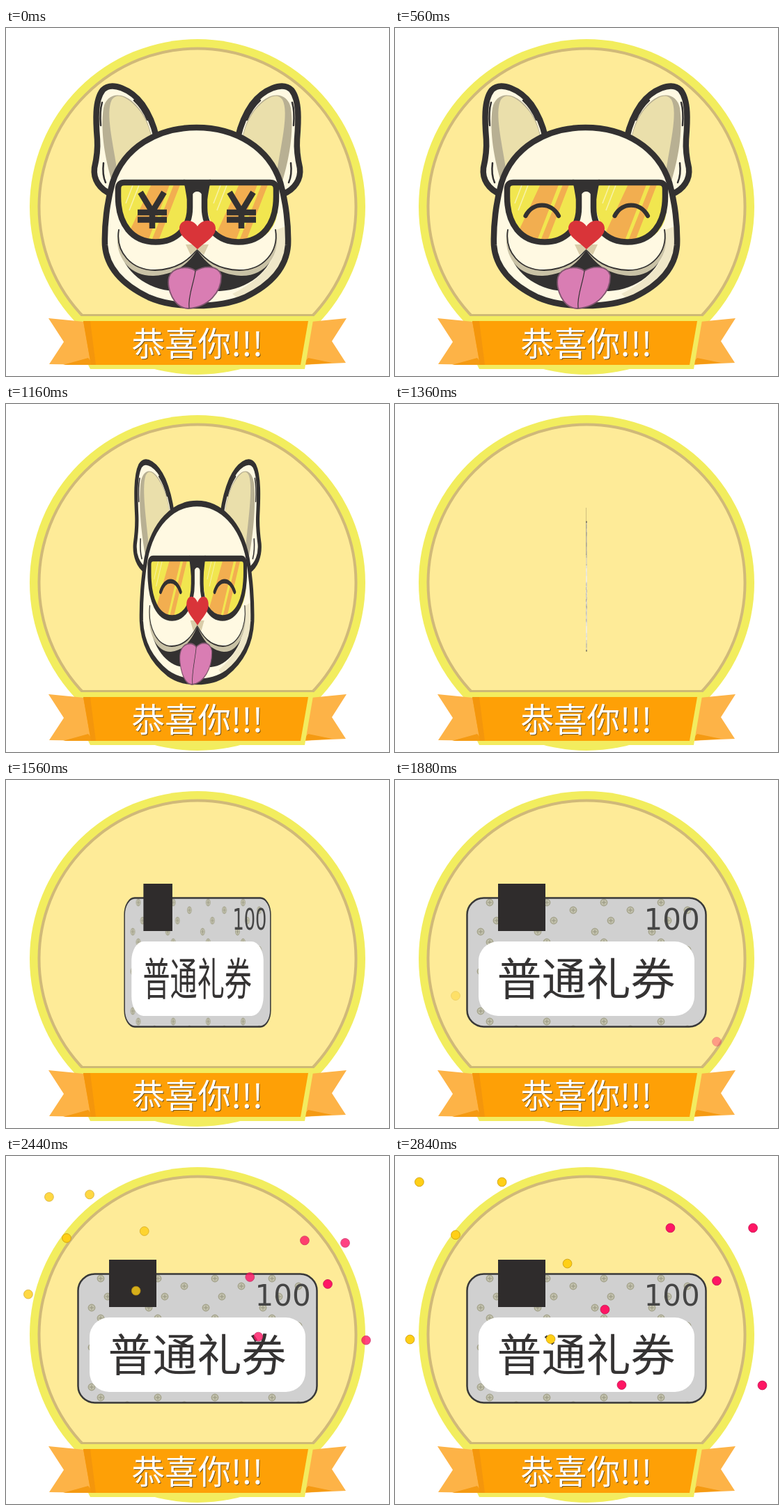
Recreate the animation shown at these times as an HTML page. Size 550 by 500 pixels, loop 2880 ms.

```html
<!DOCTYPE html>
<html lang="zh">
<head>
<meta charset="utf-8">
<style>
  html, body { margin: 0; width: 100%; height: 100%; overflow: hidden; background: #fff; }
  svg { display: block; width: 100vw; height: 100vh; }
  .cjk { font-family: "Noto Sans CJK SC", "Noto Sans CJK", sans-serif; text-anchor: middle; }
  .ink { fill: none; stroke: #333131; stroke-linecap: round; stroke-linejoin: round; }
</style>
</head>
<body>
<svg viewBox="0 0 550 500">
  <defs>
    <path id="lens" d="M170 222H255Q264 222 264 232V258C264 288 244 307.500 215 307.500C181 307.500 161 282 161 242V231Q161 222 170 222Z"/>
    <clipPath id="lensClip"><use href="#lens"/></clipPath>
    <path id="skull" d="M273.500 143C217 143 169 172 153 222C145 250 141 285 142 312C145 352 178 374 205 387C228 397 250 399 273.500 399C297 399 320 397 343 387C370 374 402 352 405 312C406 285 402 250 394 222C378 172 330 143 273.500 143Z"/>
    <clipPath id="skullClip"><use href="#skull"/></clipPath>
    <path id="earShape" d="M152 239C134 232 125 217 127 201C130 188 132 175 131 160C129 135 127 104 139 89C152 76 180 88 196 110Q210 130 216 157"/>

    <g id="ear">
      <use href="#earShape" fill="#fff9e2"/>
      <path d="M152 220C143 190 135 150 140 115C144 95 164 90 182 106C196 118 206 136 210 160L164 212Z" fill="#b8b093"/>
      <path d="M160 208C155 170 142 122 152 103C162 88 184 108 193 120C202 133 207 146 209 160C186 172 170 188 160 208Z" fill="#eadfab"/>
      <use href="#earShape" class="ink" stroke-width="8.500"/>
      <path d="M138 107C135 117 135 128 136 140M184 104Q196 115 203 132M140 194Q138 211 143 222" class="ink" stroke-width="2.500"/>
    </g>

    <g id="glass" clip-path="url(#lensClip)">
      <path d="M155 215H270V312H155Z" fill="#f1e64f"/>
      <path d="M211 220H237L203 308H170ZM243 220H252L218 308H208Z" fill="#f2ae50"/>
      <path d="M182 226L172 252M191 226L177 262" stroke="#f8f2a8" stroke-width="1.500"/>
    </g>

    <g id="cheek">
      <path d="M161 290C154 326 176 357 212 356C245 354 262 338 274.500 319" fill="#c9c2a6"/>
      <path d="M162 290C157 322 180 348 214 348C245 347 262 334 274.500 318" fill="#fff9e2"/>
      <path d="M162 290C157 322 180 348 214 348C245 347 262 334 274.500 318" class="ink" stroke-width="1.800"/>
    </g>

    <path id="yen" d="M193 236L210 264L227 236M210 260V288M189 265H231M189 275.500H231" fill="none" stroke="#333131" stroke-width="8.500"/>
    <path id="smile" d="M187.500 270C198 249.500 224 249.500 235 270" class="ink" stroke-width="6.200"/>

    <pattern id="coins" width="82" height="57" y="168" patternUnits="userSpaceOnUse">
      <g fill="#c3c2ae" stroke="#a4a38c" stroke-width="1.500">
        <circle cx="54" cy="8" r="4.700"/><circle cx="10" cy="19" r="4.700"/>
        <circle cx="64" cy="34" r="4.700"/><circle cx="41" cy="50" r="4.700"/>
      </g>
      <path d="M51 8h6M54 5v6M7 19h6M10 16v6M61 34h6M64 31v6M38 50h6M41 47v6" stroke="#96957f"/>
    </pattern>
  </defs>

  <!-- badge -->
  <circle cx="275" cy="257" r="241" fill="#f2ed5e"/>
  <circle cx="275" cy="257" r="227.500" fill="#feeb98" stroke="#d0b979" stroke-width="4"/>

  <g id="dog">
    <use href="#ear"/>
    <use href="#ear" transform="translate(549 0) scale(-1 1)"/>
    <use href="#skull" fill="#fff9e2"/>
    <g clip-path="url(#skullClip)">
      <path d="M388 290Q398 345 325 382L350 402L415 350V280Z" fill="#efe7c8"/>
      <path d="M163 314C168 350 202 376 242 378H307C347 376 381 350 386 314L274.500 318Z" fill="#333131"/>
    </g>
    <use href="#cheek"/>
    <use href="#cheek" transform="translate(549 0) scale(-1 1)"/>
    <path d="M258 311H291L284 326L274.500 318L265 326Z" fill="#d9cda9"/>
    <use href="#skull" class="ink" stroke-width="8.500"/>

    <use href="#glass"/>
    <use href="#glass" x="126"/>
    <g id="yenEyes"><use href="#yen"/><use href="#yen" x="128"/></g>
    <g id="happyEyes"><use href="#smile"/><use href="#smile" x="128"/></g>
    <use href="#lens" class="ink" stroke-width="8.500"/>
    <use href="#lens" class="ink" stroke-width="8.500" transform="translate(549 0) scale(-1 1)"/>
    <path d="M255 217.800H294L287 258Q284 235 274.500 235Q265 235 262 258Z" fill="#333131"/>

    <path d="M275 318C263 306 249 300 249 288C249 274 268 273 275 285C282 273 301 274 301 288C301 300 287 306 275 318Z" fill="#d93439"/>
    <path d="M272 349C262 341 239 343 234 358C230 374 241 403 262 403C290 401 310 380 309 355C305 341 285 341 272 349Z" fill="#d97db3" stroke="#80556f" stroke-width="1.800"/>
    <path d="M272 349C270 366 261 385 263 402" class="ink" stroke-width="1.200"/>
  </g>

  <g id="card">
    <rect x="103.500" y="169.500" width="343" height="185" rx="24" fill="#d0d0d0"/>
    <rect x="103.500" y="169.500" width="343" height="185" rx="24" fill="url(#coins)" stroke="#393939" stroke-width="2.500"/>
    <rect x="120" y="232" width="310" height="107" rx="28" fill="#fff"/>
    <rect x="148" y="149" width="68" height="68" fill="#2f2c2c"/>
    <text x="357.500" y="215" font-family="'DejaVu Sans', sans-serif" font-size="42" fill="#454545">100</text>
    <text x="274.500" y="309" class="cjk" font-size="64" fill="#353333">普通礼券</text>
  </g>

  <!-- ribbon -->
  <path d="M61 417L112 422L126 484L62 483L83 451ZM489 417L438 422L424 484L488 481L468 450Z" fill="#fdb347"/>
  <path d="M82 484L118 474L126 484ZM468 481L434 474L424 484Z" fill="#f59a12"/>
  <path d="M108 414H442L429 490H121L118 484H126L112 421H108Z" fill="#f3ec5f"/>
  <path d="M108 412.500H442" stroke="#cdb975" stroke-width="3"/>
  <path d="M111 421H434L423 484H122Z" fill="#fea006"/>
  <path d="M111 421H121L129 484H122Z" fill="#f4960c"/>
  <g class="cjk" font-size="47.500">
    <text x="275.800" y="472" fill="#755319">恭喜你!!!</text>
    <text x="274.800" y="470.700" fill="#fff">恭喜你!!!</text>
  </g>

  <g id="confetti"></g>
</svg>
<script>
const LOOP = 2880, SMILE_AT = 280, FLIP_MID = 1360, FLIP_HALF = 480;
const LAUNCH = 1840, BURST = 2040, STEP = 400;
const $ = id => document.getElementById(id);
const clamp = v => Math.min(1, Math.max(0, v));

// Each spark passes from the burst centre through two waypoints, STEP ms apart.
const sparks = [
  [[-25, -59], [-52, -76]],
  [[33, -62.5], [66.5, -76]],
  [[111.5, -10], [160.5, 41]],
  [[-55, 80.5], [-65.5, 150]],
  [[99.5, 75.5], [136.5, 149.5]]
];
const rockets = [
  { x: 87, y: 113, side: 1, fill: "#ffcf16", edge: "#c99a0c" },
  { x: 462, y: 179, side: -1, fill: "#ff1664", edge: "#c01150" }
];

function addDot({ fill, edge }) {
  const dot = document.createElementNS("http://www.w3.org/2000/svg", "circle");
  dot.setAttribute("r", 6.4);
  dot.setAttribute("fill", fill);
  dot.setAttribute("stroke", edge);
  dot.setAttribute("stroke-width", 0.8);
  $("confetti").append(dot);
  return dot;
}
for (const rocket of rockets) {
  rocket.dot = addDot(rocket);
  rocket.sparks = sparks.map(() => addDot(rocket));
}

function place(dot, x, y, opacity) {
  dot.setAttribute("cx", x);
  dot.setAttribute("cy", y);
  dot.setAttribute("opacity", opacity);
}

function flip(t) {
  const turn = clamp((t - FLIP_MID + FLIP_HALF) / (2 * FLIP_HALF)) * Math.PI;
  const scale = Math.abs(Math.cos(turn));
  const showDog = t < FLIP_MID;
  for (const [id, shown] of [["dog", showDog], ["card", !showDog]]) {
    $(id).style.display = shown ? "" : "none";
    $(id).setAttribute("transform", `translate(275 0) scale(${scale} 1) translate(-275 0)`);
  }
}

function render(t) {
  flip(t);
  $("yenEyes").style.display = t < SMILE_AT ? "" : "none";
  $("happyEyes").style.display = t < SMILE_AT ? "none" : "";

  const s = (t - BURST) / STEP;
  const first = s * (2 - s), second = s * (s - 1) / 2;
  for (const { x, y, side, dot, sparks: dots } of rockets) {
    const top = y + 258 * Math.exp(-6.58 * (t - LAUNCH) / 1000);
    place(dot, x, top, clamp((t - LAUNCH) / 110));
    dots.forEach((spark, i) => {
      const [a, b] = sparks[i];
      place(spark,
        x + side * (a[0] * first + b[0] * second),
        top + a[1] * first + b[1] * second,
        clamp(s * 0.8));
    });
  }
}

const start = performance.now();
function tick() {
  render((performance.now() - start) % LOOP);
  requestAnimationFrame(tick);
}
tick();
</script>
</body>
</html>
```
